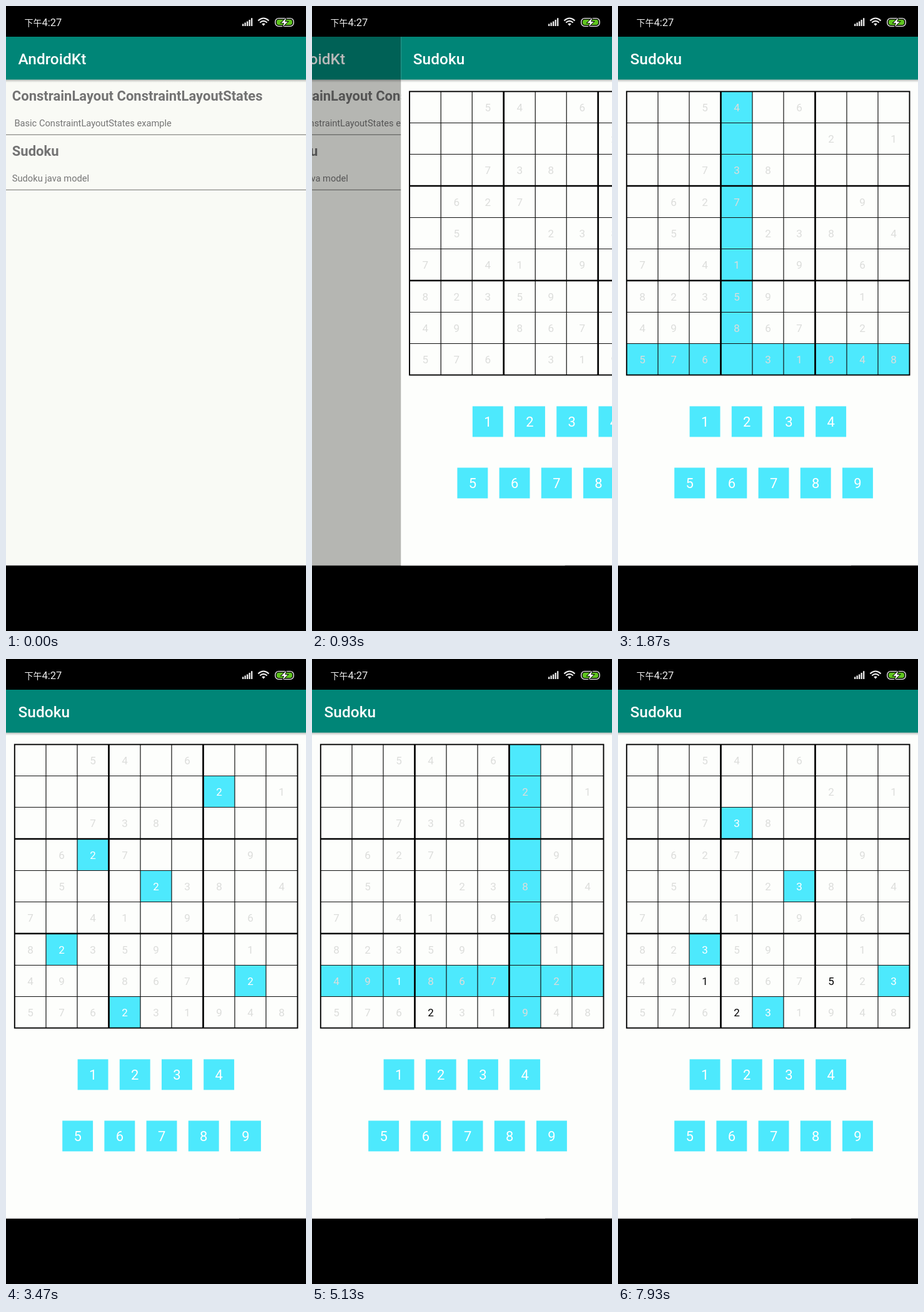
An HTML page for the animation above (8 s loop, 480 by 997 pixels).

```html
<!DOCTYPE html>
<html lang="en">
<head>
<meta charset="utf-8">
<title>Sudoku</title>
<style>
  html, body { margin: 0; width: 100%; height: 100%; overflow: hidden; background: #000; }
  svg { display: block; width: 100%; height: 100%; font-family: Roboto, sans-serif; }
  .title { font-size: 24.44px; font-weight: 500; fill: #fff; }
  .head { font-size: 22px; font-weight: 700; fill: #737373; }
  .sub { font-size: 14.67px; fill: #757575; }
  .cell { font-size: 17.1px; text-anchor: middle; }
  .key { font-size: 22px; text-anchor: middle; fill: #fff; }
  .time { font-size: 16.5px; fill: #eee; }
  .cjk { font-family: "Noto Sans CJK SC", "Noto Sans CJK", sans-serif; font-size: 14px; }
</style>
</head>
<body>
<svg viewBox="0 0 480 997">
  <defs>
    <clipPath id="screen"><path d="M0 49H480V892.5H0Z"/></clipPath>
    <linearGradient id="shadow" x2="0" y2="1">
      <stop stop-color="#000" stop-opacity=".24"/>
      <stop offset="1" stop-color="#000" stop-opacity="0"/>
    </linearGradient>
    <g id="bar">
      <path d="M0 49H480V117.5H0Z" fill="#008577"/>
      <path d="M0 117.5H480V122H0Z" fill="url(#shadow)"/>
    </g>
  </defs>
  <path d="M0 0H480V997H0Z"/>

  <g clip-path="url(#screen)">
    <g id="list">
      <path d="M0 49H480V893H0Z" fill="#f9faf5"/>
      <use href="#bar"/>
      <text class="title" x="19.6" y="93">AndroidKt</text>
      <text class="head" x="9.8" y="151">ConstrainLayout ConstraintLayoutStates</text>
      <text class="sub" x="13.4" y="192">Basic ConstraintLayoutStates example</text>
      <text class="head" x="9.8" y="239">Sudoku</text>
      <text class="sub" x="9.8" y="280">Sudoku java model</text>
      <path d="M0 205.3H480M0 293.3H480" stroke="#8b8b88" stroke-width="1.3"/>
    </g>
    <path id="shade" d="M0 49H480V893H0Z"/>
    <g id="game">
      <path d="M0 49H480V893H0Z" fill="#fdfefc"/>
      <use href="#bar"/>
      <text class="title" x="19.6" y="93">Sudoku</text>
      <g id="board"></g>
      <g id="keys"></g>
    </g>
  </g>

  <text class="time" x="57.5" y="32">4:27</text>
  <text class="time cjk" x="29.5" y="31.5">下午</text>
  <path d="M379.2 32V28.6M382.7 32V26.6M386.2 32V24.4M389.7 32V22M393.2 32V19.2" stroke="#eee" stroke-width="2.3"/>
  <g fill="none" stroke="#eee" stroke-width="2">
    <path d="M403.4 23.4Q412 15.6 420.6 23.4M406.3 26.4Q412 21.4 417.7 26.4"/>
    <path d="M409.2 28.5Q412 26.4 414.8 28.5L412 31.8Z" fill="#eee" stroke="none"/>
  </g>
  <rect x="430.8" y="19.6" width="29.4" height="12.8" rx="5.4" fill="none" stroke="#eee" stroke-width="1.4"/>
  <rect x="433" y="21.8" width="25" height="8.4" rx="3.4" fill="#5fc51e"/>
  <path d="M448.6 18.6L440.4 26.9H445L442.6 33.2L450.8 24.9H446.3Z" fill="#fff" stroke="#000" stroke-width="1.8" paint-order="stroke"/>
</svg>

<script>
const LOOP = 8000, TICK = 200 / 3;
const SLIDE_START = 785, SLIDE_END = 1200;
const CYAN = '#4de9fd', GIVEN = '#dcdddb';
const puzzle = ['005406000', '000000201', '007380000', '062700090', '050023804',
                '704109060', '823590010', '490867020', '576031948'];

// Each move: time of the tap on a cell, time of the key press, row, column, digit.
const moves = [
  { pick: 1870, put: 2470, r: 8, c: 3, n: '2' },
  { pick: 3530, put: 4070, r: 7, c: 2, n: '1' },
  { pick: 5130, put: 6470, r: 7, c: 6, n: '5' },
  { pick: 7200, put: 7930, r: 7, c: 8, n: '3' }
];

const $ = id => document.getElementById(id);
const list = $('list'), shade = $('shade'), game = $('game');

function add(parent, tag, attrs) {
  const node = document.createElementNS('http://www.w3.org/2000/svg', tag);
  for (const k in attrs) node.setAttribute(k, attrs[k]);
  return parent.appendChild(node);
}

const step = i => 50 * i + Math.floor(i / 3);
const cells = [];

function buildBoard() {
  const board = $('board');
  for (let r = 0; r < 9; r++) {
    for (let c = 0; c < 9; c++) {
      const x = 14.5 + step(c), y = 137 + step(r);
      const box = add(board, 'rect', { x: x - .5, y: y - .5, width: 50, height: 50 });
      const text = add(board, 'text', { class: 'cell', x: x + 24.6, y: y + 31.2 });
      cells.push({ r, c, box, text });
    }
  }
  let thin = '', thick = '';
  for (let i = 1; i < 9; i++) {
    const gap = i % 3 ? .5 : 1;
    const line = `M${14.5 + step(i) - gap} 136V589M14 ${137 + step(i) - gap}H467`;
    if (i % 3) thin += line; else thick += line;
  }
  add(board, 'path', { d: thin, stroke: '#111', 'stroke-width': 1.2 });
  add(board, 'path', { d: thick, stroke: '#000', 'stroke-width': 2.7 });
  add(board, 'rect', { x: 13.8, y: 136.4, width: 452.7, height: 452.2,
    fill: 'none', stroke: '#000', 'stroke-width': 1.9 });
}

function buildKeys() {
  for (let n = 1; n <= 9; n++) {
    const low = n > 4;
    const x = low ? 90.2 + (n - 5) * 67.2 : 114.6 + (n - 1) * 67.2;
    const y = low ? 736.5 : 638.5;
    add($('keys'), 'rect', { x, y, width: 48.9, height: 48.9, fill: CYAN });
    add($('keys'), 'text', { class: 'key', x: x + 24.5, y: y + 32.8 }).textContent = n;
  }
}

function drawBoard(t) {
  const last = moves.filter(m => t >= m.pick).pop();
  const picking = last && t < last.put;
  for (const { r, c, box, text } of cells) {
    const entry = moves.find(m => m.r === r && m.c === c && t >= m.put);
    const digit = entry ? entry.n : puzzle[r][c].replace('0', '');
    const lit = last && (picking ? r === last.r || c === last.c : digit === last.n);
    box.setAttribute('fill', lit ? CYAN : '#fdfefc');
    text.textContent = digit;
    text.setAttribute('fill', lit && (entry || !picking) ? '#fff' : entry ? '#000' : GIVEN);
  }
}

function drawSlide(t) {
  const now = Math.floor((t + 4) / TICK) * TICK;
  const p = Math.min(1, Math.max(0, (now - SLIDE_START) / (SLIDE_END - SLIDE_START)));
  const shown = p > .999 ? 1 : 1 - Math.pow(1 - p, 2.75);
  list.setAttribute('transform', `translate(${-107 * shown} 0)`);
  shade.setAttribute('opacity', .39 * shown);
  game.setAttribute('transform', `translate(${480 * (1 - shown)} 0)`);
}

function frame() {
  const t = performance.now() % LOOP;
  drawSlide(t);
  drawBoard(t);
  requestAnimationFrame(frame);
}

buildBoard();
buildKeys();
frame();
</script>
</body>
</html>
```
